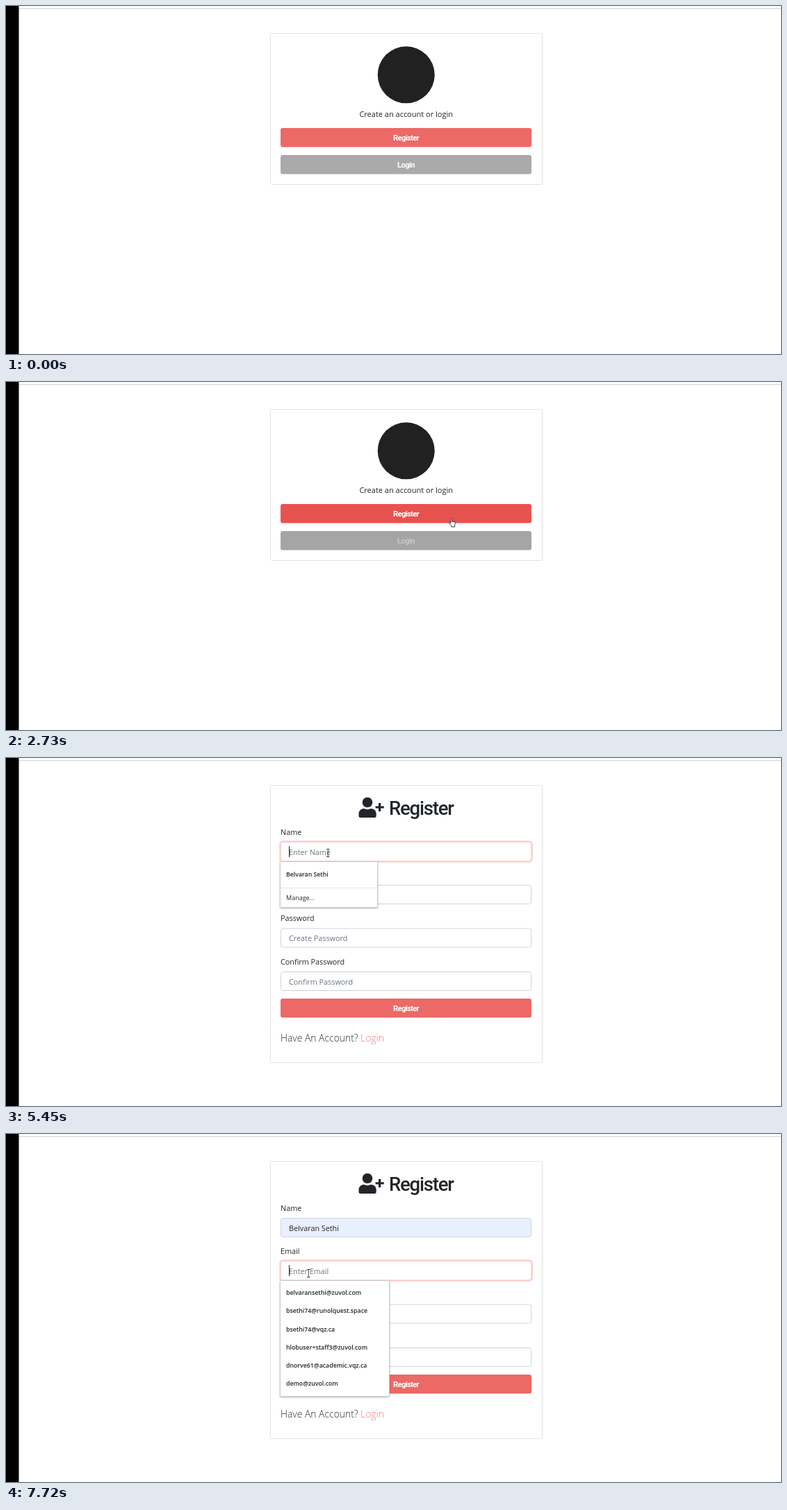
These frames come from a looping animation (1115x502 px, 8000 ms). An HTML page:

```html
<!DOCTYPE html>
<html lang="en">
<head>
<meta charset="utf-8">
<title>Account registration</title>
<style>
html, body { margin: 0; width: 100%; height: 100%; overflow: hidden; background: #fff; }
svg { display: block; width: 100vw; height: 100vh; }
text { font: 10.8px "Open Sans", "Noto Sans", sans-serif; fill: #212529; white-space: pre; }
.intro { font-size: 11px; text-anchor: middle; }
.btn { font: 700 11.3px Roboto, sans-serif; letter-spacing: -.7px; text-anchor: middle; }
.title { font: 500 27.5px Roboto, sans-serif; letter-spacing: -1.2px; }
.hint { fill: #6c757d; }
.lead { font-size: 13.9px; font-weight: 300; }
.link { fill: #ef7d79; }
.item { font-size: 8.75px; font-weight: 600; }
.manage { font-size: 9px; }
.menu { filter: drop-shadow(0 1px 1px rgba(0, 0, 0, .3)); }
</style>
</head>
<body>
<svg id="stage" viewBox="0 0 1115 502" preserveAspectRatio="none"></svg>
<script>
const LOOP = 8000;
const stage = document.getElementById('stage');
const person = 'Belvaran Sethi';
const emails = [
  'belvaransethi@zuvol.com', 'bsethi74@runolquest.space', 'bsethi74@vqz.ca',
  'hlobuser+staff3@zuvol.com', 'dnorve61@academic.vqz.ca', 'demo@zuvol.com'
];
const T = {
  enterLogin: 2490, enterRegister: 2640, press: 3490, form: 3960,
  focusName: 5300, nameMenu: 5380, preview: 6250, pick: 6560,
  focusEmail: 7560, emailMenu: 7640
};

// Pointer moves: start, end, number of steps, way points
const moves = [
  [800, 880, 2, [[949, 472], [963, 460]]],
  [1250, 1490, 4, [[895, 435], [805, 394], [743, 367], [724, 359]]],
  [1870, 2640, 11, [[735, 363], [744, 364], [700, 335], [640, 290], [596, 263], [594, 261],
    [596, 254], [601, 245], [610, 234], [622, 216], [634, 198]]],
  [2730, 3340, 9, [[640, 196], [650, 190], [657, 187], [661, 186]]],
  [4500, 5120, 9, [[655, 182], [630, 172], [590, 160], [540, 150], [490, 141], [463, 137]]],
  [6080, 6700, 8, [[463, 140], [461, 150], [458, 158], [456, 159]]],
  [6870, 7330, 7, [[455, 163], [450, 176], [441, 192], [435, 201]]]
];

const ramp = (t, from, to) => Math.min(1, Math.max(0, (t - from) / (to - from)));
const within = (t, from, to) => t >= from && t < to;
const mix = (a, b, k) => `rgb(${a.map((v, i) => Math.round(v + (b[i] - v) * k))})`;
const text = (x, y, s, cls = '') => `<text x="${x}" y="${y}" class="${cls}">${s}</text>`;
const rect = (x, y, w, h, fill, more = '') =>
  `<rect x="${x}" y="${y}" width="${w}" height="${h}" fill="${fill}" ${more}/>`;
const outline = (x, y, w, h, color, fill = '#fff', r = 3) =>
  rect(x + .5, y + .5, w - 1, h - 1, fill, `rx="${r}" stroke="${color}"`);

function pointer(t) {
  const move = moves.filter(m => t >= m[0]).pop();
  if (!move) return null;
  const [start, end, steps, pts] = move;
  const step = Math.min(steps - 1, Math.floor((t - start) / (end - start) * (steps - 1) + .06));
  const u = step / (steps - 1) * (pts.length - 1);
  const i = Math.min(pts.length - 2, Math.floor(u));
  return pts[i].map((v, axis) => Math.round(v + (pts[i + 1][axis] - v) * (u - i)));
}

function pointerKind(t, y) {
  if (t < T.form) return within(y, 176, 204) || within(y, 215, 243) ? 'hand' : 'arrow';
  if (t < 4500) return 'hand';
  return within(y, 121, 149) || within(y, 183, 211) ? 'beam' : 'arrow';
}

const shapes = {
  arrow: '<path d="M.5.5V10.6L2.8 8.5 4.3 12 5.9 11.3 4.4 7.9H7.4Z" fill="#fff" stroke="#222" stroke-width=".9"/>',
  hand: '<path d="M0 1.2C0-.3 1.9-.3 1.9 1.2V5.2L5.5 5.9C6.4 6.1 6.6 6.7 6.4 7.5L5.6 10.8V13H.8V11.3L-2 8.1C-2.7 7.2-1.4 6.3-.6 7L0 7.6Z" fill="#fff" stroke="#222" stroke-width=".9"/>',
  beam: '<path d="M-2-5.5H2.5M-2 5.5H2.5M.25-5.5V5.5" fill="none" stroke="#333" stroke-width=".9"/>'
};

function cursor(t) {
  const p = pointer(t);
  return p ? `<g transform="translate(${p})">${shapes[pointerKind(t, p[1])]}</g>` : '';
}

function button(y, label, fill, color = '#fff') {
  return rect(395, y, 361, 27.5, fill, 'rx="3"') +
    `<text x="575.5" y="${y + 18.3}" class="btn" style="fill:${color}">${label}</text>`;
}

function landing(t) {
  const login = ramp(t, T.enterLogin, 2600) * (1 - ramp(t, T.enterRegister, 2990));
  const hover = ramp(t, T.enterRegister - 40, 2740);
  const press = ramp(t, T.press - 50, 3650);
  let s = outline(380, 39, 392, 219, '#dfdfdf') +
    '<circle cx="575.7" cy="99.3" r="41" fill="#212121"/>' +
    text(575.7, 160, 'Create an account or login', 'intro');
  if (press) s += rect(394, 174.7, 363, 30, 'none', `rx="4" stroke="#eb6864" stroke-width="2.4" opacity="${press * .5}"`);
  return s + button(176, 'Register', mix([236, 105, 102], [232, 80, 76], hover)) +
    button(215, 'Login', mix([170, 170, 170], [163, 163, 163], login), mix([255, 255, 255], [181, 181, 181], login));
}

function field(y, label, hint, focus = 0, value = '') {
  const ring = focus ? rect(395, y, 361, 28, 'none', `rx="3.5" stroke="#f9cfcd" stroke-width="3.6" opacity="${focus}"`) : '';
  return text(395, y - 10.3, label) + ring +
    outline(395, y, 361, 28, focus ? mix([206, 212, 218], [249, 214, 213], focus) : '#ced4da', value ? '#e8f0fe' : '#fff') +
    text(407, y + 18.5, value || hint, value ? '' : 'hint');
}

const caret = (x, y) => rect(x, y, 1, 16, '#222');

function nameMenu(hover) {
  return '<g class="menu">' + outline(394, 149, 141, 67, '#ccc', '#fff', 1) + '</g>' +
    (hover ? rect(395, 150, 139, 37, '#eee') : '') +
    rect(395, 187, 139, 1, '#dfe3e6') +
    text(403, 170.5, person, 'item') + text(403, 205, 'Manage...', 'manage');
}

function emailMenu() {
  return '<g class="menu">' + outline(394, 211, 158, 168, '#ccc', '#fff', 1) + '</g>' +
    emails.map((e, i) => text(403, 232.3 + i * 26.1, e, 'item')).join('');
}

function form(t) {
  const email = ramp(t, T.focusEmail - 50, 7710);
  const name = ramp(t, T.focusName - 50, 5440) * (1 - email);
  let s = outline(380, 39, 392, 401, '#dfdfdf') +
    '<g fill="#212529"><circle cx="520" cy="64" r="7.3"/>' +
    '<path d="M507.5 83.5V80.5C507.5 75.8 511 73 515 73C518 74.5 522 74.5 525 73C529.5 73 532.7 76 532.7 80.5V83.5Q532.7 86 530 86H510Q507.5 86 507.5 83.5Z"/>' +
    '<path d="M536 65h3.2v4.4h4.6v3.2h-4.6V77H536v-4.4h-4.4v-3.2H536z"/></g>' +
    text(551, 82, 'Register', 'title') +
    field(121, 'Name', 'Enter Name', name, t >= T.preview ? person : '') +
    field(183, 'Email', 'Enter Email', email) +
    field(245.5, 'Password', 'Create Password') +
    field(308, 'Confirm Password', 'Confirm Password') +
    button(347, 'Register', '#ec6966') +
    text(395, 408.5, 'Have An Account?', 'lead') + text(510, 408.5, 'Login', 'lead link');
  if (within(t, T.focusName, 5850)) s += caret(407, 127);
  if (within(t, T.pick, 7100)) s += caret(480, 127);
  if (t >= T.focusEmail) s += caret(407, 189);
  if (within(t, T.nameMenu, T.pick)) s += nameMenu(t >= T.preview);
  if (t >= T.emailMenu) s += emailMenu();
  return s;
}

function scene(t) {
  return rect(0, 0, 1115, 502, '#fff') +
    rect(18, 3, 1097, 1, '#d3d3d3') + rect(0, 0, 18.5, 502, '#000') +
    (t < T.form ? landing(t) : form(t)) +
    (within(t, 400, 560) ? outline(1082, 499, 27, 10, '#ccc', '#fff', 0) : '') +
    cursor(t);
}

let shown = '';
function tick(now) {
  const next = scene(now % LOOP);
  if (next !== shown) stage.innerHTML = shown = next;
  requestAnimationFrame(tick);
}
tick(performance.now());
</script>
</body>
</html>
```
